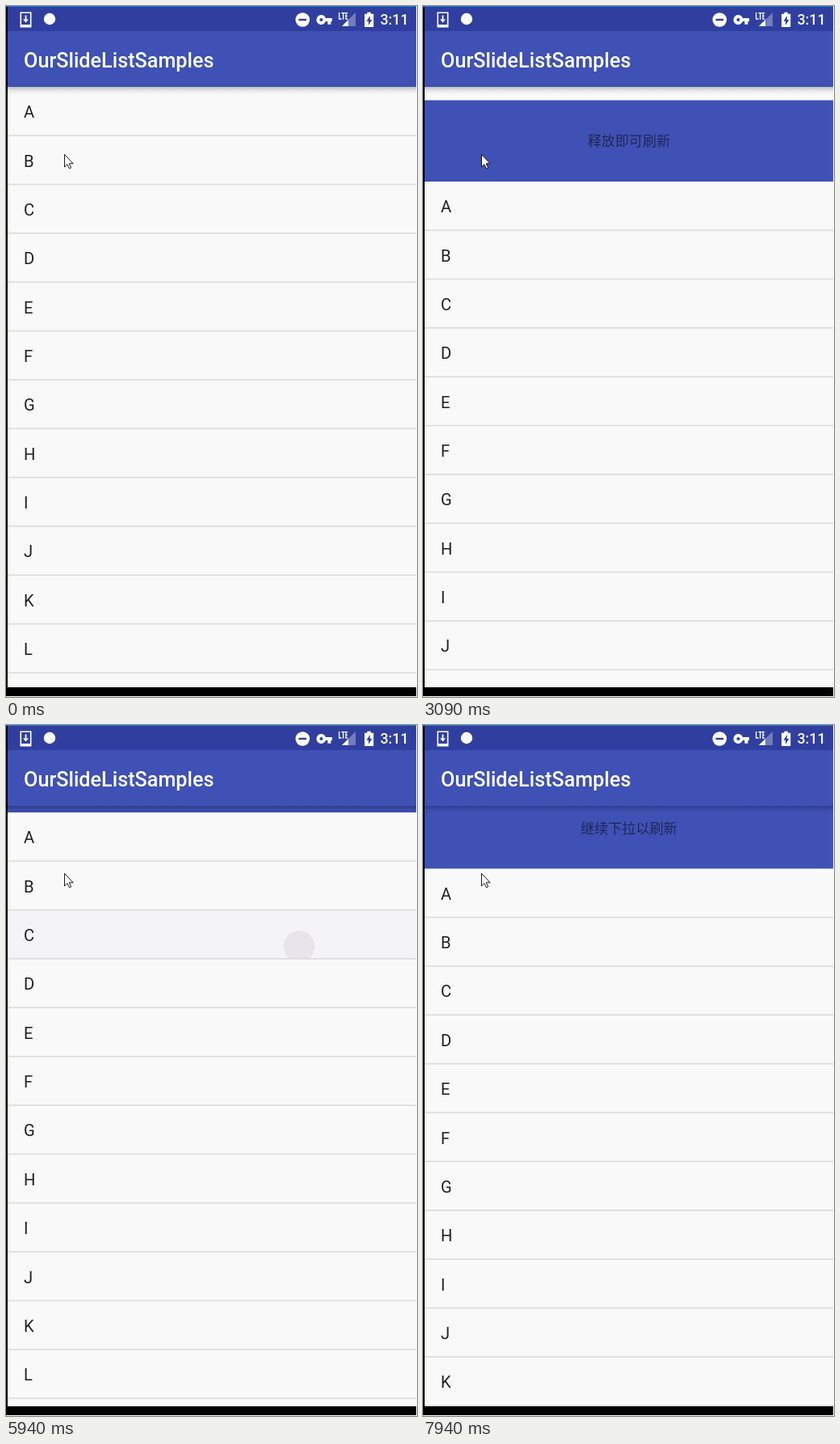
Recreate the animation shown at these times as an HTML page. Size 509x854 px, loop 8000 ms.

```html
<!DOCTYPE html>
<html lang="zh">
<head>
<meta charset="utf-8">
<title>List</title>
<style>
  html, body { margin: 0; width: 100%; height: 100%; overflow: hidden; background: #f9f9f9; }
  svg { display: block; width: 509px; height: 854px; }
  text { font-family: Roboto, sans-serif; }
  #rows text { font-size: 20.2px; fill: #212121; }
  #hint { font: 17.1px "Noto Sans CJK SC", "Noto Sans CJK", sans-serif; text-anchor: middle; fill: #1f2857; }
</style>
</head>
<body>
<svg viewBox="0 0 509 854">
  <defs>
    <linearGradient id="shade" x2="0" y2="1">
      <stop offset="0" stop-color="#000" stop-opacity=".23"/>
      <stop offset=".5" stop-color="#000" stop-opacity=".08"/>
      <stop offset="1" stop-color="#000" stop-opacity="0"/>
    </linearGradient>
    <clipPath id="view"><rect x="2" y="100" width="506" height="742"/></clipPath>
    <clipPath id="rowClip"><rect x="2" y="120.5" width="506" height="60.4"/></clipPath>
  </defs>

  <rect width="509" height="854" fill="#f9f9f9"/>
  <g clip-path="url(#view)">
    <g id="list">
      <rect x="2" y="-100.5" width="506" height="100.5" fill="#3f51b5"/>
      <text id="hint" x="255" y="-44"></text>
      <g id="press" clip-path="url(#rowClip)">
        <rect x="2" y="120" width="506" height="62" fill="#f4f4f6"/>
        <circle id="ripple" cx="363" cy="165.5" r="19.3" fill="#e7e5e9"/>
      </g>
      <g id="rows"></g>
    </g>
    <rect id="thumb" x="503" width="5" height="570" fill="#000" fill-opacity=".3"/>
    <rect x="2" y="100" width="506" height="9" fill="url(#shade)"/>
  </g>

  <rect x="2" y="1" width="506" height="30" fill="#303f9f"/>
  <rect x="2" y="31" width="506" height="69" fill="#3f51b5"/>
  <text x="22" y="75.6" font-size="25.2" font-weight="500" fill="#fff">OurSlideListSamples</text>

  <g fill="#fff">
    <path d="M18.3 8.3h12.4v17.4h-12.4z" fill="none" stroke="#fff" stroke-width="1.6"/>
    <path d="M18 23h13v3h-13zM23.6 11.5h1.8v5h2.6l-3.5 4-3.5-4h2.6z"/>
    <circle cx="54" cy="16" r="7.2"/>
    <circle cx="367.3" cy="17" r="8.8"/>
    <path d="M362.5 15.8h9.6v2.4h-9.6z" fill="#303f9f"/>
    <path fill-rule="evenodd" d="M396 14.9h8v4.2h-1.6v3.6h-4v-3.6h-2.4a6 6 0 1 1 0-4.2zM388.3 17a2.1 2.1 0 1 0 4.2 0a2.1 2.1 0 1 0-4.2 0z"/>
    <path d="M433 8v17h-17z" opacity=".32"/>
    <path d="M424 17v8h-8z"/>
    <path d="M412.6 8v8h3M415.3 8.7h4.6M417.6 8.7v8M423.2 8.7h-2.2v7.3h2.2M421 12.3h2" fill="none" stroke="#fff" stroke-width="1.3"/>
    <path d="M444 9.8h3.4v-2h4.4v2h3.4v16.2h-11.2z"/>
    <path d="M450.8 12l-4.3 6.7h2.5v5l4.3-6.8h-2.5z" fill="#303f9f"/>
    <text x="463.5" y="23.3" font-size="17.8" font-weight="500">3:11</text>
  </g>

  <rect width="508" height="1" fill="#1883d7"/>
  <rect y="1" width="2" height="852" fill="#000"/>
  <rect y="842" width="508" height="11" fill="#000"/>

  <path d="M72.5 183.5v15.5l3.4-3.3 2.6 5.2 2.2-1-2.5-5.1h5z" fill="#fff" stroke="#000" stroke-width=".9"/>
</svg>

<script>
const LOOP = 8000, TOP = 100, ROW = 60.36, VIEW = 742;
const LETTERS = [..."ABCDEFGHIJKLIJKL"];
const FIRST_PULL = 2140, RELEASE = 3250, SCROLL = 4070, FLICK = 4910, SECOND_PULL = 5940, PUSH_BACK = 7200;
const $ = id => document.getElementById(id);

// 0 before start, 1 after end, linear in between
const ramp = (t, start, end) => Math.min(1, Math.max(0, (t - start) / (end - start)));
const mix = (a, b, p) => a + (b - a) * p;
const easeOut = (p, power) => 1 - (1 - p) ** power;

// Positive is pulled down, negative is scrolled
function listOffset(t) {
  if (t < FIRST_PULL) return 0;
  if (t < RELEASE) return mix(13, 117, easeOut(ramp(t, FIRST_PULL + 25, 3090), 1.3));
  if (t < SCROLL) return mix(117, 0, easeOut(ramp(t, RELEASE, 4040), 2.43));
  if (t < FLICK) return mix(0, -150, ramp(t, SCROLL, 4420));
  if (t < SECOND_PULL) return mix(-89.3, 0, ramp(t, FLICK + 25, 5020));
  if (t < PUSH_BACK) return mix(8, 110, ramp(t, SECOND_PULL, PUSH_BACK));
  return mix(110, 77.5, ramp(t, PUSH_BACK, 7940));
}

$("rows").innerHTML = LETTERS.map((letter, i) =>
  `<text x="22" y="${i * ROW + 38.2}">${letter}</text>
   <rect x="2" y="${(i + 1) * ROW - 1}" width="506" height="1.5" fill="#dadada"/>`).join("");

function draw(t) {
  const offset = listOffset(t);
  $("list").setAttribute("transform", `translate(0 ${TOP + offset})`);
  $("hint").textContent = offset >= 100 ? "释放即可刷新" : "继续下拉以刷新";

  const age = t - (t < SECOND_PULL ? FIRST_PULL : SECOND_PULL);
  $("press").setAttribute("opacity", age < 0 ? 0 : 1 - ramp(age, 550, 800));
  $("ripple").setAttribute("opacity", 1 - ramp(age, 30, 280));

  $("thumb").setAttribute("y", TOP + Math.max(0, -offset) * VIEW / (LETTERS.length * ROW));
  $("thumb").setAttribute("opacity", t < SCROLL ? 0 : 1 - ramp(t, 5450, 5630));
}

const start = performance.now();
function tick() {
  draw((performance.now() - start) % LOOP);
  requestAnimationFrame(tick);
}
tick();
</script>
</body>
</html>
```
